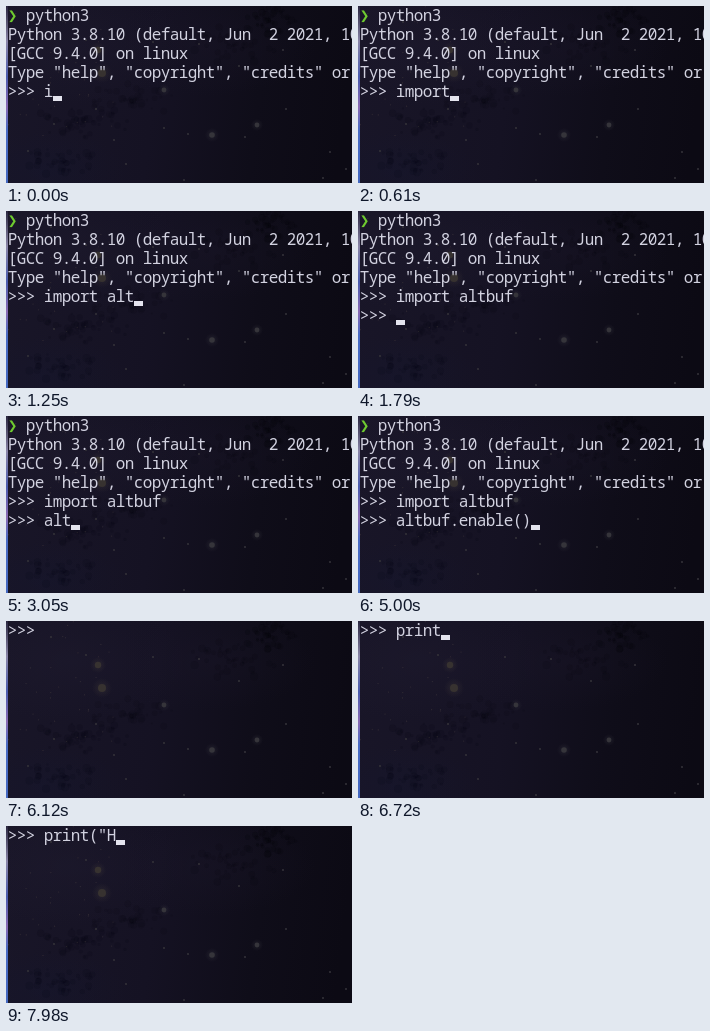
These frames come from a looping animation (346 px wide and 177 px high, 8000 ms). An HTML page with a canvas:

```html
<!DOCTYPE html>
<html lang="en">
<head>
<meta charset="utf-8">
<title>Python session</title>
<style>
  html, body { margin: 0; width: 100%; height: 100%; overflow: hidden; background: #0e0c19; }
  canvas { position: absolute; left: 0; top: 0; }
</style>
</head>
<body>
<canvas id="sky" width="346" height="177"></canvas>
<canvas id="terminal" width="346" height="177"></canvas>
<script>
const W = 346, H = 177, LOOP = 8000;
const COL = 9, ROW = 19, LEFT = 2, BASELINE = 15, CURSOR_HEIGHT = 5;
const PROMPT = ">>> ";
const BANNER = `❯ python3
Python 3.8.10 (default, Jun  2 2021, 10:49:15)
[GCC 9.4.0] on linux
Type "help", "copyright", "credits" or "license" for more information.
`;

// Time in ms and keys entered; \n runs the line, \f also clears the screen.
const KEYS = [
  [0, "i"], [120, "m"], [240, "po"], [360, "r"], [610, "t"], [730, " "],
  [870, "a"], [1000, "l"], [1250, "t"], [1400, "b"], [1540, "uf"], [1790, "\n"],
  [2550, "a"], [2800, "l"], [3050, "t"], [3170, "b"], [3290, "u"], [3410, "f"],
  [3660, "."], [3780, "e"], [3900, "n"], [4150, "a"], [4270, "b"], [4390, "l"],
  [4510, "e"], [4880, "("], [5000, ")"], [5370, "\f"],
  [6240, "p"], [6360, "r"], [6480, "i"], [6600, "n"], [6720, "t"],
  [6970, "("], [7470, '"'], [7980, "H"]
];
const cursorVisible = t => t < 6120 || t >= 6240;

function screenText(t) {
  let text = BANNER + PROMPT;
  for (const [time, key] of KEYS) {
    if (time > t) break;
    if (key === "\f") text = PROMPT;
    else text += key === "\n" ? "\n" + PROMPT : key;
  }
  return text;
}

function drawSky(g) {
  let seed = 7;
  const random = () => (seed = seed * 16807 % 2147483647) / 2147483647;

  const glow = (x, y, rx, ry, rgb, alpha) => {
    g.save();
    g.translate(x, y);
    g.scale(rx, ry);
    const fill = g.createRadialGradient(0, 0, 0, 0, 0, 1);
    fill.addColorStop(0, `rgba(${rgb},${alpha})`);
    fill.addColorStop(1, `rgba(${rgb},0)`);
    g.fillStyle = fill;
    g.fillRect(-1, -1, 2, 2);
    g.restore();
  };
  const star = (x, y, r, color) => {
    g.fillStyle = color;
    g.beginPath();
    g.arc(x, y, r, 0, 2 * Math.PI);
    g.fill();
  };
  // A ragged patch: small discs scattered around a centre.
  const patch = (x, y, rx, ry, color) => {
    for (let i = 0; i < 45; i++) {
      const angle = random() * 2 * Math.PI, reach = random();
      star(x + rx * reach * Math.cos(angle), y + ry * reach * Math.sin(angle), 1 + random() * 3, color);
    }
  };

  const base = g.createLinearGradient(0, 0, W, 40);
  base.addColorStop(0, "#191628");
  base.addColorStop(0.45, "#151223");
  base.addColorStop(0.75, "#0f0d19");
  base.addColorStop(1, "#0c0a14");
  g.fillStyle = base;
  g.fillRect(0, 0, W, H);

  glow(60, 40, 120, 60, "32,28,48", 0.4);
  glow(200, 40, 110, 50, "26,22,40", 0.4);
  glow(40, 165, 80, 40, "20,22,46", 0.4);
  patch(75, 115, 50, 18, "rgba(9,8,18,.16)");
  patch(55, 155, 40, 14, "rgba(9,10,24,.14)");
  patch(125, 95, 45, 18, "rgba(10,8,18,.12)");
  patch(262, 14, 28, 16, "rgba(4,3,8,.2)");
  patch(225, 40, 45, 20, "rgba(8,7,14,.14)");

  const bigStars = [[92, 44, 4], [96, 67, 5], [158, 84, 3], [206, 129, 3.5], [251, 119, 3]];
  for (const [x, y, r] of bigStars) {
    const warm = x < 100;
    glow(x, y, r * 2, r * 2, warm ? "80,72,64" : "70,70,78", 0.3);
    star(x, y, r * 0.8, warm ? "#373230" : "#35343a");
  }
  const smallStars = [
    [45, 16], [80, 34], [147, 36], [193, 38], [277, 44], [233, 60], [90, 103],
    [48, 118], [158, 122], [182, 128], [108, 134], [239, 131], [22, 145],
    [120, 158], [324, 146], [317, 172], [340, 163], [280, 103], [178, 174]
  ];
  for (const [x, y] of smallStars) star(x, y, 1.1, "#333138");
  for (let i = 0; i < 40; i++) star(random() * 110, random() * 130, 0.6, "rgba(110,96,86,.3)");

  const edge = g.createLinearGradient(0, 0, 0, H);
  edge.addColorStop(0, "#2a2740");
  edge.addColorStop(0.2, "#8a86a8");
  edge.addColorStop(0.4, "#4a5cae");
  edge.addColorStop(0.57, "#8a6cb4");
  edge.addColorStop(0.7, "#4a6cc4");
  edge.addColorStop(1, "#4468c0");
  g.fillStyle = edge;
  g.fillRect(0, 0, 2, H);
}

function drawTerminal(g, t) {
  g.clearRect(0, 0, W, H);
  g.font = 'semi-condensed 16px "Noto Sans Mono", "DejaVu Sans Mono", monospace';
  g.textAlign = "center";
  const lines = screenText(t).split("\n");
  lines.forEach((line, row) => {
    [...line].forEach((char, col) => {
      g.fillStyle = char === "❯" ? "#6fcb30" : "#d2d2e0";
      g.fillText(char, LEFT + (col + 0.5) * COL, row * ROW + BASELINE);
    });
  });
  if (cursorVisible(t)) {
    const row = lines.length - 1;
    g.fillStyle = "#e4e4ee";
    g.fillRect(LEFT + lines[row].length * COL, (row + 1) * ROW - CURSOR_HEIGHT, COL, CURSOR_HEIGHT);
  }
}

const context = id => document.getElementById(id).getContext("2d");
const terminal = context("terminal");
drawSky(context("sky"));

function frame() {
  drawTerminal(terminal, performance.now() % LOOP);
  requestAnimationFrame(frame);
}
frame();
</script>
</body>
</html>
```
